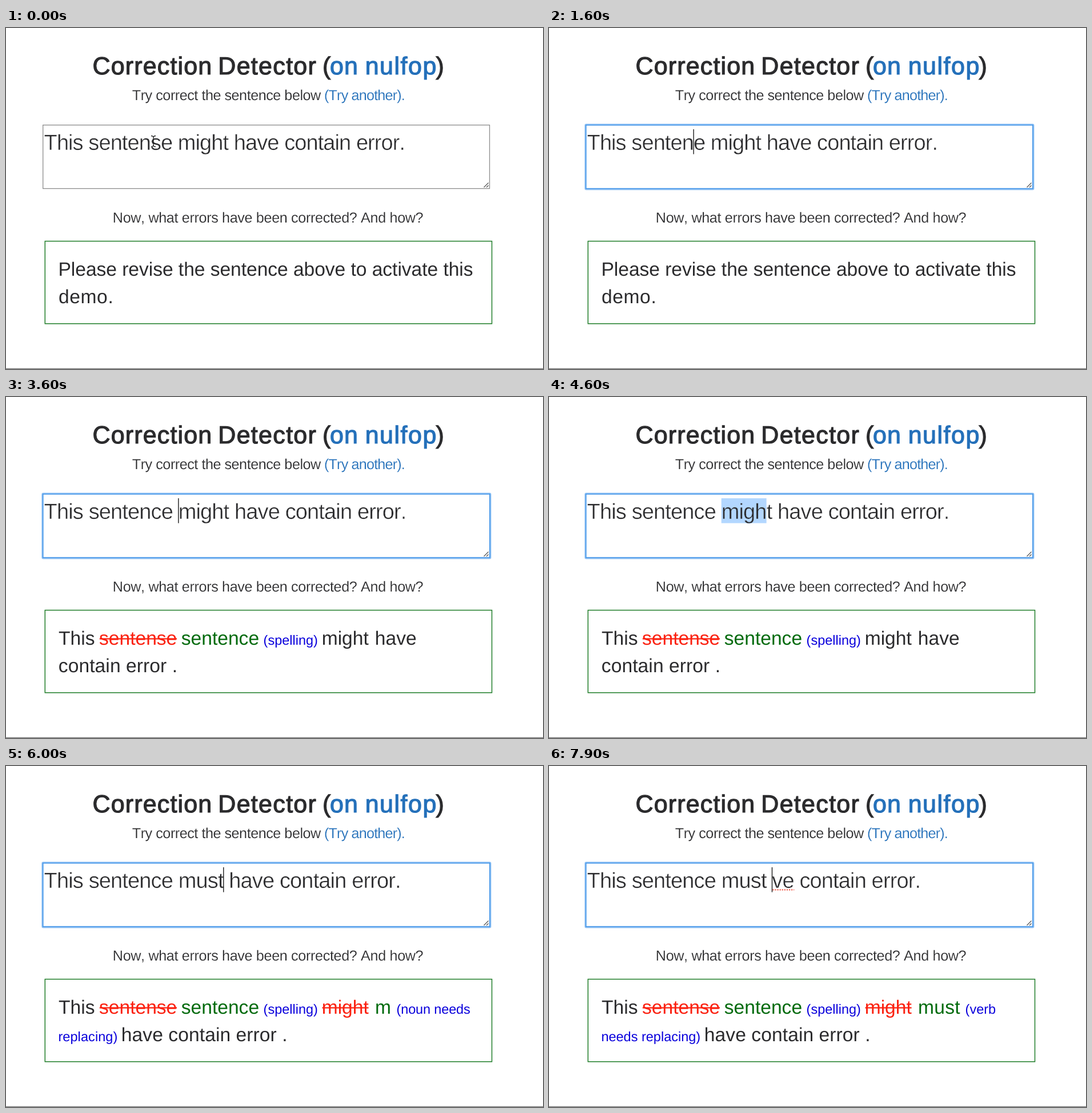
These frames come from a looping animation (940 px wide and 596 px high, 8 s). An HTML page:

```html
<!DOCTYPE html>
<html lang="en">
<head>
<meta charset="utf-8">
<title>Correction Detector</title>
<style>
  html, body { margin: 0; width: 100%; height: 100%; overflow: hidden; background: #fff; }
  svg { display: block; width: 940px; height: 596px; }
  text {
    font-family: "Liberation Sans", Arial, sans-serif;
    font-kerning: none;
    text-rendering: geometricPrecision;
    white-space: pre;
    fill: #2b2b2d;
  }
  /* A background-coloured outline thins the letters to a light weight. */
  .light { font-size: 25.2px; stroke: #fff; stroke-width: .2px; }
  .input { font-size: 38px; stroke: #fff; stroke-width: .5px; }
  .input .sel { stroke: #b3d7ff; }
  .title { font-size: 43px; stroke: #2b2b2d; stroke-width: 1.2px; }
  .link { fill: #2470ba; }
  .title.link { stroke: #2470ba; }
  .out { font-size: 33.6px; }
  .old { fill: #fb2110; }
  .new { fill: #016a0c; }
  .note { font-size: 23.5px; fill: #0a00dc; }
</style>
</head>
<body>
<svg viewBox="0 0 940 596">
  <g id="page"></g>

  <rect id="plain" x="64.7" y="169.6" width="781.8" height="111" fill="none" stroke="#8c8c8c" stroke-width="1.3"/>
  <g id="focus" fill="none">
    <rect x="63.4" y="168.400" width="785" height="113.800" rx="2" stroke="#a5cdf6" stroke-width="2.400"/>
    <rect x="64.600" y="169.600" width="782.400" height="111.200" stroke="#4f9cea" stroke-width="2"/>
  </g>
  <path d="M836.5 278.5l8-8M841 278.5l3.500-3.500" stroke="#555" stroke-width="1.2"/>

  <rect id="mark" y="177" height="43.500" fill="#b3d7ff"/>
  <text id="input" class="input" x="66.600" y="212.600"></text>
  <line id="typo" y1="216.300" y2="216.300" stroke="#f0604f" stroke-width="2.200" stroke-dasharray="2.200 1.900"/>
  <rect id="caret" y="177" width="1.400" height="43.500" fill="#1c1c1c"/>
  <path id="beam" d="M-4-9.500Q0-9.500 0-6.500Q0-9.500 4-9.500M0-7V7M-4 9.500Q0 9.500 0 6.500Q0 9.500 4 9.500M-2 3H2"
        fill="none" stroke="#222" stroke-width="1.300"/>

  <rect x="68.300" y="372.600" width="782.200" height="144.200" fill="none" stroke="#1f7d28" stroke-width="1.500"/>
  <g id="output"></g>
  <path d="M0 595.300H940" stroke="#7a7a7a" stroke-width="1.200"/>
</svg>
<script>
const LOOP = 8000;
const $ = id => document.getElementById(id);

function el(parent, name, attrs, text = "") {
  const node = document.createElementNS("http://www.w3.org/2000/svg", name);
  for (const key in attrs) node.setAttribute(key, attrs[key]);
  node.textContent = text;
  parent.append(node);
  return node;
}

// x, y, text, class, letter spacing
function put(parent, [x, y, text, cls, gap = 0]) {
  return el(parent, "text", { x, y, class: cls, style: `letter-spacing:${gap}px` }, text);
}

const HEAD = 81, SUB = 126, ASK = 339.7;
[
  [151.5, HEAD, "Correction", "title", 1.15],
  [371.3, HEAD, "Detector", "title", 1.3],
  [554, HEAD, "(", "title"],
  [567, HEAD, "on", "title link", 1],
  [628.7, HEAD, "nulfop", "title link", 1.5],
  [752.5, HEAD, ")", "title"],
  [220.8, SUB, "Try correct the sentence below", "light", -.48],
  [557, SUB, "(Try another).", "light link", -.83],
  [186.8, ASK, "Now, what errors have been corrected? And how?", "light", -.36]
].forEach(line => put($("page"), line));

const TOP = 432.5, LOW = 480.5;
const spelling = [
  [92, TOP, "This", "out"],
  [163, TOP, "sentense", "out old"],
  [306.8, TOP, "sentence", "out new"],
  [450.6, TOP, "(spelling)", "out note"]
];
const might = [552.7, TOP, "might", "out old"];
const rest = x => [x, LOW, "have contain error .", "out", .08];

const panels = {
  hint: [
    [91.5, TOP, "Please revise the sentence above to activate this", "out", -.04],
    [92, LOW, "demo.", "out", .6]
  ],
  wait: [
    [91.4, TOP, "Connecting to a slow remote server to", "out", .13],
    [92, LOW, "calculate...", "out", .3]
  ],
  first: [
    ...spelling,
    [552.7, TOP, "might", "out"],
    [645.8, TOP, "have", "out"],
    [91.8, LOW, "contain error .", "out", .08]
  ],
  noun: [
    ...spelling, might,
    [646, TOP, "m", "out new"],
    [683.6, TOP, "(noun needs", "out note", -.15],
    [91.4, LOW, "replacing)", "out note", .08],
    rest(201.8)
  ],
  verb: [
    ...spelling, might,
    [645.9, TOP, "must", "out new", .3],
    [728.6, TOP, "(verb", "out note"],
    [91.4, LOW, "needs replacing)", "out note"],
    rest(271.8)
  ]
};

// Build every panel once; only one is shown at a time.
for (const name in panels) {
  const group = panels[name].group = el($("output"), "g", {});
  for (const line of panels[name]) {
    const text = put(group, line);
    if (line[3].endsWith("old")) {
      el(group, "rect", {
        x: line[0] + .8, y: TOP - 11, height: 2.2,
        width: text.getComputedTextLength() - 1, fill: "#fb2110"
      });
    }
  }
}

const panelSteps = [
  [0, "hint"], [2500, "wait"], [2700, "first"], [5500, "wait"],
  [5800, "noun"], [6500, "wait"], [6900, "verb"]
];

// Text before "|" precedes the caret; "[...]" is selected.
const END = " have contain error.";
const inputSteps = [
  [0, "This sentense might" + END],
  [600, "This sentens|e might" + END],
  [1400, "This senten|e might" + END],
  [2150, "This sentenc|e might" + END],
  [3200, "This sentence| might" + END],
  [3500, "This sentence |might" + END],
  [3900, "This sentence [m]ight" + END],
  [4100, "This sentence [mi]ght" + END],
  [4300, "This sentence [mig]ht" + END],
  [4500, "This sentence [migh]t" + END],
  [4700, "This sentence [might]" + END],
  [5000, "This sentence m|" + END],
  [5500, "This sentence mu|" + END],
  [5700, "This sentence mus|" + END],
  [5900, "This sentence must|" + END],
  [6950, "This sentence must |have contain error."],
  [7200, "This sentence must h|ave contain error."],
  [7400, "This sentence must ha|ve contain error."],
  [7600, "This sentence must h|ve contain error."],
  [7800, "This sentence must |ve contain error."]
];

const stepAt = (steps, t) => steps.findLast(step => step[0] <= t);
const show = (node, on) => node.setAttribute("visibility", on ? "visible" : "hidden");
const endX = n => $("input").getEndPositionOfChar(n - 1).x;

let shownInput;
function setInput(source) {
  if (source === shownInput) return;
  shownInput = source;
  const input = $("input");
  input.textContent = "";
  input.style.letterSpacing = source.includes("sentence") ? "-.86px" : "-.92px";
  source.replace("|", "").split(/[\[\]]/).forEach((part, i) =>
    el(input, "tspan", i === 1 ? { class: "sel" } : {}, part));

  const from = source.indexOf("["), to = source.indexOf("]") - 1;
  show($("mark"), from > 0);
  if (from > 0) {
    const x = endX(from);
    $("mark").setAttribute("x", x);
    $("mark").setAttribute("width", endX(to) - x);
  }
  const at = source.indexOf("|");
  if (at > 0) $("caret").setAttribute("x", endX(at) - .5);

  const typo = source.includes(" |ve ");
  show($("typo"), typo);
  if (typo) {
    $("typo").setAttribute("x1", endX(at) + 1);
    $("typo").setAttribute("x2", endX(at + 2) + .5);
  }
}

function draw(t) {
  const [since, source] = stepAt(inputSteps, t);
  setInput(source);
  show($("caret"), source.includes("|") && (t - since) % 1000 < 500);
  show($("plain"), t < 600);
  show($("focus"), t >= 600);

  const p = Math.min(1, Math.max(0, (t - 100) / 400));
  const ease = p * p * (3 - 2 * p);
  show($("beam"), t < 1400);
  $("beam").setAttribute("transform", `translate(${258 + 14 * ease} ${198 + 2 * ease})`);

  const current = stepAt(panelSteps, t)[1];
  for (const name in panels) show(panels[name].group, name === current);
}

const start = performance.now();
function tick() {
  draw((performance.now() - start) % LOOP);
  requestAnimationFrame(tick);
}
tick();
</script>
</body>
</html>
```
